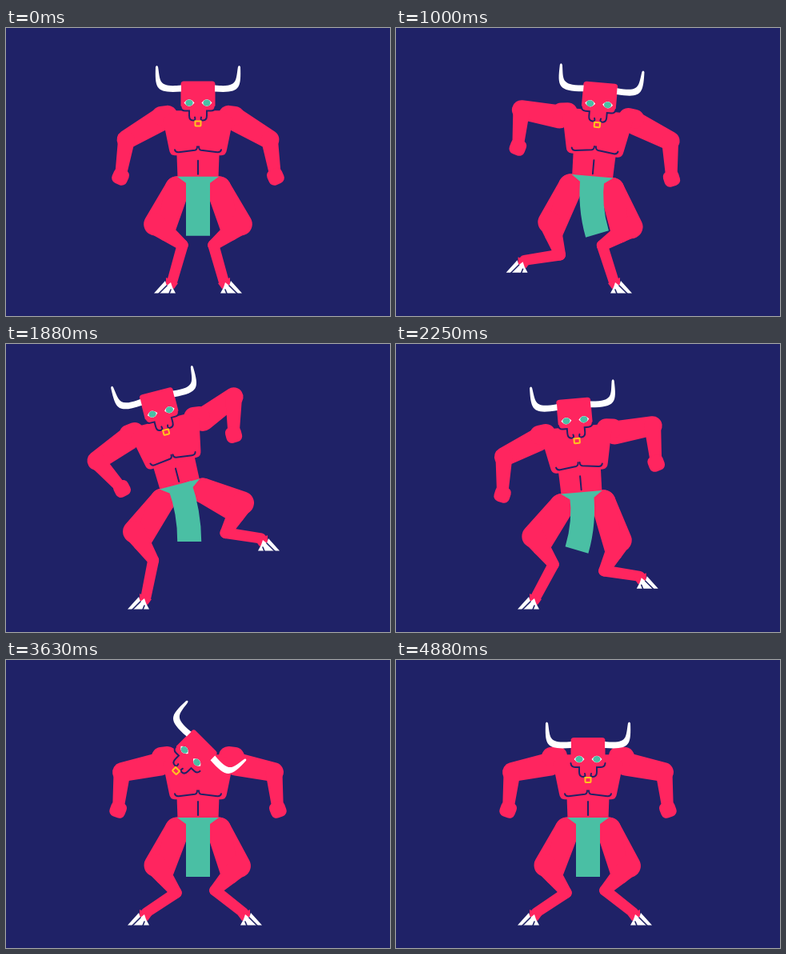
Write an HTML page with a canvas that moves like this. It is 480 px wide and 360 px high and loops after 5 s.

```html
<!DOCTYPE html>
<html lang="en">
<head>
<meta charset="utf-8">
<title>Dancing minotaur</title>
<style>
html, body { margin: 0; height: 100%; overflow: hidden; background: #1f2267; }
canvas { display: block; }
</style>
</head>
<body>
<canvas id="stage" width="480" height="360"></canvas>
<script>
const ctx = document.getElementById('stage').getContext('2d');
const NAVY = '#1f2267', RED = '#ff255f', TEAL = '#4abfa4', GOLD = '#ffc31f', WHITE = '#fff';
const LOOP = 5000, STEP = 125, KICK = 10, BEAT = 5, GROUND = 316;
const THIGH = 52, CALF = 43, SHIN = 47, UPPER_ARM = 48, FOREARM = 47;

const rad = deg => deg * Math.PI / 180;
const mix = (a, b, u) => a + (b - a) * u;
const clamp = u => Math.min(1, Math.max(0, u));
const smooth = u => (u = clamp(u), u * u * (3 - 2 * u));
const easeOut = u => 1 - (1 - clamp(u)) ** 2;

// crouch: 0 tall, 1 low. side: the leg that kicks, -1 left or 1 right.
function poseAt(k) {
  const pose = { x: 240, lean: 0, lift: 0, wind: 0, side: 0, sway: 0, feet: [173, 299], tilt: 0 };
  if (k < 2 * KICK) {
    const first = k < KICK, p = k % KICK / KICK;
    const side = first ? -1 : 1, rising = p < 0.5;
    const lift = rising ? easeOut((p - 0.2) / 0.3) : smooth((1 - p) / 0.5);
    const step = rising ? lift : 1;
    Object.assign(pose, { side, lift });
    pose.x -= side * lift * (first ? 16 : 23);
    pose.lean = -14.5 * side * lift;
    pose.crouch = (first && rising ? 0.2 : 1) * (2 * p - 1) ** 2;
    pose.wind = p < 0.4 ? Math.sin(2.5 * Math.PI * p) : 0;
    pose.sway = 20 * side * Math.sin(2 * Math.PI * p) ** 4;
    pose.feet = first
      ? [mix(206, 173, step) - 41 * lift, 274]
      : [173, mix(274, 299, step) + 22 * lift];
  } else {
    const beat = Math.floor((k - 2 * KICK) / BEAT), p = k % BEAT / BEAT;
    const bounce = Math.max(0, Math.sin(1.25 * Math.PI * p));
    pose.crouch = 1 - bounce * 2 / (2 + beat * beat);
    pose.tilt = 45 * (smooth((k - 27) / 2) - smooth((k - 30) / 5));
  }
  pose.y = 183 + 14 * pose.crouch - 8 * pose.lift;
  pose.dip = 20 * pose.crouch ** 2 - 4;
  return pose;
}

function fill(path, color) {
  ctx.fillStyle = color;
  ctx.fill(new Path2D(path));
}

function stroke(path, color, width) {
  ctx.strokeStyle = color;
  ctx.lineWidth = width;
  ctx.stroke(new Path2D(path));
}

// Hull of two circles.
function limb(x1, y1, r1, x2, y2, r2) {
  const a = Math.atan2(y2 - y1, x2 - x1);
  const d = Math.acos((r1 - r2) / Math.hypot(x2 - x1, y2 - y1));
  ctx.fillStyle = RED;
  ctx.beginPath();
  ctx.arc(x1, y1, r1, a + d, a - d + 2 * Math.PI);
  ctx.arc(x2, y2, r2, a - d, a + d);
  ctx.fill();
}

function at(x, y, angle, draw, flip = 1) {
  ctx.save();
  ctx.translate(x, y);
  ctx.rotate(rad(angle));
  ctx.scale(flip, 1);
  draw();
  ctx.restore();
}

const bothSides = draw => [1, -1].forEach(flip => at(0, 0, 0, draw, flip));

function drawArm(side, [sx, sy], { side: kicking, crouch, lift, wind }) {
  let upper = 35 - 23 * crouch, fore = 10 - 4 * crouch;
  if (side === kicking) {
    upper = mix(upper, -36, Math.sqrt(lift)) + 26 * wind;
    fore = mix(fore, 0, lift);
  } else if (kicking) {
    fore = mix(fore, -42, lift * lift);
  }
  const u = rad(upper), f = rad(fore);
  const ex = sx + side * UPPER_ARM * Math.cos(u), ey = sy + UPPER_ARM * Math.sin(u);
  const hx = ex + side * FOREARM * Math.sin(f), hy = ey + FOREARM * Math.cos(f);
  limb(sx, sy, 14.5, ex, ey, 12);
  limb(ex, ey, 10.5, hx, hy, 7);
  at(hx, hy, -side * (fore + 15), () => {
    ctx.beginPath();
    ctx.roundRect(-10, -10, 20, 20, 7);
    ctx.fill();
  });
}

// The shin folds as the hip nears the ankle; the knee then follows from both bones.
function drawLeg(side, [hx, hy], ax, ay) {
  const fold = Math.min(46.5, Math.max(4, 4 + 1.5 * (121 - ay + hy) + 0.25 * side * (ax - hx)));
  const kx = ax - side * fold, ky = ay - Math.sqrt(SHIN ** 2 - fold ** 2);
  const dx = kx - hx, dy = ky - hy, d = Math.hypot(dx, dy);
  const along = (THIGH ** 2 - CALF ** 2 + d * d) / (2 * d);
  const out = side * Math.sqrt(Math.max(0, THIGH ** 2 - along ** 2));
  const nx = hx + (dx * along + dy * out) / d, ny = hy + (dy * along - dx * out) / d;
  limb(hx, hy, 15.5, nx, ny, 14.5);
  limb(hx, hy, 15.5, mix(nx, kx, 0.38), mix(ny, ky, 0.38), 11);
  limb(nx, ny, 13.5, kx, ky, 7);
  limb(kx, ky, 7, ax - side * 2, ay, 6.5);
  at(ax, ay, 0, () => {
    fill('M-6 -4L9 3L4 10L-6 5Z', RED);
    fill('M-21 15.5L-7 0L-5 6L0 2L2 8L6 15.5Z', WHITE);
    stroke('M-15 16L-5 6M-2 16L0 11', NAVY, 1.6);
  }, -side);
}

function drawTorso(sink) {
  fill('M-27 -40H27L25.5 1H-25.5Z', RED);
  bothSides(() => limb(-46, -76, 12, -38, -77, 12));
  at(0, sink, 0, () => {
    fill('M-30 -82H30L44 -72L36 -33Q35 -26 29 -26H-29Q-35 -26 -36 -33L-44 -72Z', RED);
    bothSides(() => stroke('M-29 -33Q-28 -29.5 -24 -30L-4 -32.5Q-1 -33 -1 -37', NAVY, 2));
  });
  stroke('M0 -20V-3', NAVY, 2);
}

function drawCloth(x, y, top, bottom) {
  const half = 36.5, w = 15;
  const point = (px, py, angle, side) =>
    [px + side * w * Math.cos(rad(angle)), py + side * w * Math.sin(rad(angle))];
  const cx = x - half * Math.sin(rad(top)), cy = y + half * Math.cos(rad(top));
  const bx = cx - half * Math.sin(rad(bottom)), by = cy + half * Math.cos(rad(bottom));
  const mid = (top + bottom) / 2;
  ctx.fillStyle = TEAL;
  ctx.beginPath();
  ctx.moveTo(...point(x, y, top, -1));
  ctx.quadraticCurveTo(...point(cx, cy, mid, -1), ...point(bx, by, bottom, -1));
  ctx.lineTo(...point(bx, by, bottom, 1));
  ctx.quadraticCurveTo(...point(cx, cy, mid, 1), ...point(x, y, top, 1));
  ctx.fill();
}

function drawHead() {
  fill('M-17.5 -14H17.5Q21.5 -14 21.5 -10V18Q21.5 23 16 23H11V35H-11V23H-16Q-21.5 23 -21.5 18V-10Q-21.5 -14 -17.5 -14Z', RED);
  bothSides(() => {
    fill('M-21 -9C-50 -6 -47 -14 -50 -32Q-51.5 -35 -53 -32C-54 -4 -52 1 -21 -1Z', WHITE);
    fill('M-17.5 13Q-11 4.5 -4.5 13Q-11 21.5 -17.5 13Z', WHITE);
    fill('M-15.7 13a4.7 4 0 1 0 9.4 0a4.7 4 0 1 0 -9.4 0Z', TEAL);
    stroke('M-21.5 18Q-21 23 -16 23H-11V29Q-11 35 -6 35Q-2.5 35 -4 31', NAVY, 2);
  });
  stroke('M-3.5 36H3.5V41Q3.5 42 2.5 42H-2.5Q-3.5 42 -3.5 41Z', GOLD, 2);
}

function draw(k) {
  const pose = poseAt(k), { x, y, lean, dip, tilt, feet } = pose;
  const c = Math.cos(rad(lean)), s = Math.sin(rad(lean));
  const onBody = (px, py) => [x + px * c - py * s, y + px * s + py * c];
  const sink = 0.2 * dip;
  ctx.fillStyle = NAVY;
  ctx.fillRect(0, 0, 480, 360);
  ctx.lineCap = 'round';
  for (const side of [-1, 1]) drawArm(side, onBody(side * 48, sink - 70), pose);
  at(x, y, lean, () => drawTorso(sink));
  [-1, 1].forEach((side, i) => {
    const raised = side === pose.side ? 73 * pose.lift : 0;
    drawLeg(side, onBody(side * 26, 15), feet[i], GROUND - raised);
  });
  at(x, y, lean, () => fill('M-26 0H26L15 8H-15Z', TEAL));
  drawCloth(x, y + 1, 1.35 * lean, pose.sway);
  at(...onBody(0, dip - 102), lean + tilt, drawHead);
}

// Eight drawings a second, with starts rounded to 10 ms.
function tick(now) {
  const t = now % LOOP;
  let k = Math.floor(t / STEP);
  if (t < Math.round(k * STEP / 10) * 10) k--;
  draw(k);
  requestAnimationFrame(tick);
}
draw(0);
requestAnimationFrame(tick);
</script>
</body>
</html>
```
